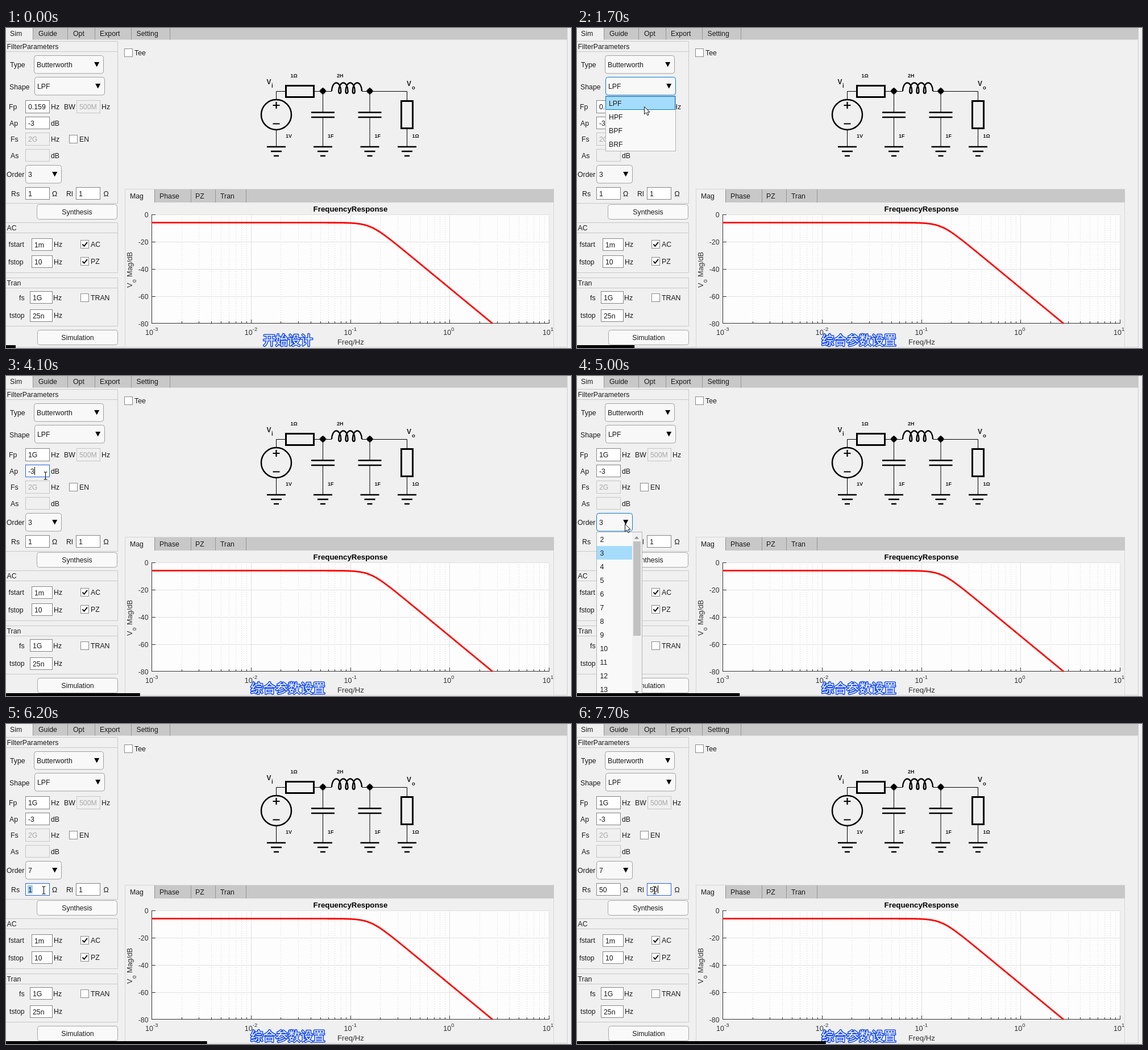
An HTML page that plays this animation: 994x563 px, repeating every 8 s.

```html
<!DOCTYPE html>
<html lang="zh">
<head>
<meta charset="utf-8">
<title>Filter design</title>
<style>
  html, body { margin: 0; width: 100%; height: 100%; overflow: hidden; background: #f0f0f0; }
  svg { display: block; width: 100%; height: 100%; }
  text { font-family: "Liberation Sans", Arial, sans-serif; font-size: 12.3px; fill: #1a1a1a; white-space: pre; }
  .b { font-weight: bold; }
  .cap { font: 500 21.9px "Noto Sans CJK SC", "Noto Sans CJK", sans-serif; fill: #fff;
    stroke: #1c50f0; stroke-width: 3.2px; stroke-linejoin: round; paint-order: stroke; }
</style>
</head>
<body>
<svg id="stage" viewBox="0 0 994 563"></svg>
<script>
const stage = document.getElementById('stage');
const BLUE = '#0a78d4', GREY = '#c8c8c8';
let layer = stage;

function el(tag, attrs, text) {
  const e = document.createElementNS('http://www.w3.org/2000/svg', tag);
  for (const a in attrs) e.setAttribute(a, attrs[a]);
  if (text !== undefined) e.textContent = text;
  layer.appendChild(e);
  return e;
}
const rect = (x, y, w, h, fill, stroke = 'none', more = {}) =>
  el('rect', { x, y, width: w, height: h, fill, stroke, ...more });
const path = (d, stroke = '#000', width = 1, fill = 'none', more = {}) =>
  el('path', { d, stroke, 'stroke-width': width, fill, ...more });
const text = (x, y, s, more = {}) => el('text', { x, y, ...more }, s);
const show = (e, on) => { e.style.display = on ? '' : 'none'; };
function group(make) {
  const outer = layer, g = el('g', {});
  layer = g;
  make();
  layer = outer;
  return g;
}

// ---- widgets ----
const fields = {};
function field(id, x, y, w, value, off = false, h = 22) {
  const box = rect(x + .5, y + .5, w - 1, h - 1, off ? '#f0f0f0' : '#fff', off ? '#c6c6c6' : '#858585');
  const mark = rect(x + 4, y + 3.5, 0, h - 7, '#99cdf5');
  const label = text(x + 5, y + 15.5, value, off ? { style: 'fill:#a8a8a8' } : {});
  const caret = rect(x, y + 4, 1, h - 8, '#000');
  show(caret, false);
  fields[id] = { x, box, mark, label, caret };
}
function setField(id, value, mode) {
  const f = fields[id];
  f.label.textContent = value;
  const w = f.label.getComputedTextLength();
  f.box.setAttribute('stroke', mode ? '#2a62e0' : '#858585');
  f.mark.setAttribute('width', mode === 'select' ? w + 2 : 0);
  show(f.caret, mode === 'caret');
  f.caret.setAttribute('x', Math.round(f.x + 5 + w));
}
function combo(x, y, w, value) {
  const box = rect(x + .5, y + .5, w - 1, 31.5, '#f8f8f8', '#a0a0a0', { rx: 4 });
  const label = text(x + 5, y + 20.5, value);
  const ax = x + w - 12.3;
  path(`M${ax - 4.5} ${y + 12}h9l-4.5 8.5z`, 'none', 0, '#000');
  return { box, label };
}
function check(x, y, label, on) {
  rect(x + .5, y + .5, 14, 14, '#fff', '#8a8a8a');
  if (on) path(`M${x + 3.5} ${y + 7.5}l3 3.3l5.5 -7`, '#111', 2);
  text(x + 18, y + 12, label);
}
function button(x, y, label) {
  rect(x + .5, y + .5, 141, 26, '#f9f9f9', '#a6a6a6', { rx: 4 });
  text(x + 71, y + 18, label, { 'text-anchor': 'middle' });
}
function panel(y, bottom, title) {
  path(`M0 ${y + .5}H196.5V${bottom + .5}H0M0 ${y + 18.5}H196`, GREY);
  text(1.5, y + 13.5, title);
}
function tabs(x, y, right, h, ends, names) {
  rect(x, y, right - x, h, GREY);
  rect(x, y, ends[0] - x, h + 1, '#f0f0f0');
  path(ends.map(e => `M${e + .5} ${y}v${h}`).join(''), '#969696');
  names.forEach(([tx, s]) => text(tx, y + h - 7, s));
}

rect(0, 0, 994, 563, '#f0f0f0');
tabs(0, 0, 987, 20.5, [47, 108, 156, 220, 288],
  [[7, 'Sim'], [57, 'Guide'], [118, 'Opt'], [165, 'Export'], [229.5, 'Setting']]);
path('M987.5 0V562M0 561.5H987', '#cfcfcf');
panel(23, 308, 'FilterParameters');
panel(342, 430, 'AC');
panel(439, 524, 'Tran');

[[7, 69, 'Type'], [6, 107.5, 'Shape'], [5, 143, 'Fp'], [79, 143, 'Hz'], [102, 143, 'BW'], [168, 143, 'Hz'],
 [6, 172, 'Ap'], [79, 172, 'dB'], [8, 200, 'Fs'], [79, 200, 'Hz'], [8, 228.5, 'As'], [79, 228.5, 'dB'],
 [1, 262, 'Order'], [9, 295.5, 'Rs'], [81, 295.5, 'Ω'], [106, 295.5, 'Rl'], [171.5, 295.5, 'Ω'],
 [4.5, 385, 'fstart'], [84, 385, 'Hz'], [4, 415.5, 'fstop'], [84, 415.5, 'Hz'],
 [23, 478.5, 'fs'], [83, 478.5, 'Hz'], [6, 510, 'tstop'], [84, 510, 'Hz']].forEach(a => text(...a));

combo(49, 48, 123, 'Butterworth');
const shape = combo(50, 86, 124, 'LPF');
const order = combo(34, 241, 64, '3');
field('fp', 34, 127, 43, '0.159', false, 23);
field('bw', 124, 127, 42, '500M', true, 23);
field('ap', 34, 156, 43, '-3');
field('fs', 34, 184, 43, '2G', true, 23);
field('as', 34, 213, 43, '', true);
field('rs', 34, 280, 43, '1');
field('rl', 123, 280, 43, '1');
field('f0', 45, 370, 37, '1m');
field('f1', 45, 400, 37, '10');
field('rate', 42, 463, 40, '1G');
field('stop', 42, 495, 40, '25n');
check(111, 188, 'EN');
check(131, 373, 'AC', true);
check(131, 403, 'PZ', true);
check(131, 467, 'TRAN');
check(208, 36, 'Tee');
button(54, 310, 'Synthesis');
button(55, 531, 'Simulation');

// ---- circuit ----
const ground = x => path(`M${x - 16.5} 209h33M${x - 9.5} 217h19M${x - 4.5} 225h9`, '#000', 2.4);
function cap(x) {
  path(`M${x} 111V148M${x} 157V208`);
  path(`M${x - 20.5} 148.5h41M${x - 20.5} 157h41`, '#000', 2.5);
  el('circle', { cx: x, cy: 111, r: 5 });
  path(`M${x - 6} 111h12M${x} 105v12`, '#000', 2);
  ground(x);
}
path('M475.5 127V111.5H491M542 111.5H573M626 111.5H705.5V128M475.5 179V208M705.5 177V208');
el('circle', { cx: 475.5, cy: 152.5, r: 26.5, fill: 'none', stroke: '#000', 'stroke-width': 2.5 });
path('M469.5 136h12M475.5 130v12M469.5 168.5h12', '#000', 2.2);
rect(492.5, 101.5, 49, 20, 'none', '#000', { 'stroke-width': 3 });
rect(695.5, 128.5, 20, 48, 'none', '#000', { 'stroke-width': 3 });
const hump = 'a8.1 14.5 0 0 1 16.25 0';
path('M573 111' + Array(4).fill(hump).join('a2 4 0 0 1 -4 0'), '#000', 2.4);
cap(557.5);
cap(640);
ground(475.5);
ground(705.5);
const bold = (x, y, s, size) => text(x, y, s, { class: 'b', style: `font-size:${size}px` });
bold(458.5, 99, 'V', 12);
bold(467, 105, 'i', 10);
bold(705, 101.5, 'V', 12);
bold(714, 107.5, 'o', 9.5);
[[500.5, 87, '1Ω'], [582, 87, '2H'], [492, 193, '1V'], [566, 193, '1F'], [648.5, 193, '1F'], [714.5, 193, '1Ω']]
  .forEach(([x, y, s]) => bold(x, y, s, 9));

// ---- chart ----
rect(209.5, 283.5, 754, 278, '#f0f0f0', '#d6d6d6');
tabs(210, 284, 964, 23, [261, 325, 368, 422], [[218, 'Mag'], [270, 'Phase'], [333, 'PZ'], [377, 'Tran']]);
const X0 = 256, X1 = 955, Y0 = 328, Y1 = 520, DEC = (X1 - X0) / 4;
const px = e => X0 + DEC * (e + 3);
const py = db => Y0 - 2.4 * db;
const crisp = v => Math.round(v) + .5;
rect(X0, Y0, X1 - X0, Y1 - Y0, '#fdfdfd');
let major = '', minor = '', ticks = '';
for (let d = -3; d <= 1; d++) {
  const x = crisp(px(d));
  major += `M${x} ${Y0}V${Y1}`;
  ticks += `M${x} ${Y1}v-7`;
  for (let m = 2; m < 10 && d < 1; m++) {
    const xm = crisp(px(d + Math.log10(m)));
    minor += `M${xm} ${Y0}V${Y1}`;
    ticks += `M${xm} ${Y1}v-4`;
  }
  text(px(d) - 11, 540, '10', { style: 'font-size:12.5px;fill:#333' });
  text(px(d) + 3, 533, d, { style: 'font-size:9.5px;fill:#333' });
}
for (let db = 0; db >= -80; db -= 20) {
  const y = crisp(py(db)) - (db === -80 ? 1 : 0);
  major += `M${X0} ${y}H${X1}`;
  ticks += `M${X0} ${y}h7`;
  text(250.5, py(db) + 5, db, { 'text-anchor': 'end', style: 'fill:#333' });
}
path(minor, '#d0d0d0', 1, 'none', { 'stroke-dasharray': '1 3' });
path(major, '#e0e0e0');
path(ticks + `M${X0 + .5} ${Y0}V${Y1 - .5}H${X1}`, '#333');

let curve = '';
for (let i = 0; i <= 300; i++) {
  const e = -3 + i * 3.433 / 300;
  const db = -6.02 - 10 * Math.log10(1 + (10 ** e / .159) ** 6);
  curve += `${i ? 'L' : 'M'}${px(e).toFixed(2)} ${py(Math.max(db, -80)).toFixed(2)}`;
}
path(curve, '#f00', 2.8);
text(606, 323, 'FrequencyResponse', { class: 'b', 'text-anchor': 'middle', style: 'font-size:13.3px;fill:#000' });
text(606.5, 557, 'Freq/Hz', { 'text-anchor': 'middle', style: 'font-size:13.2px;fill:#333' });
const axis = (y, x, s, size) =>
  text(0, 0, s, { transform: `translate(${x} ${y}) rotate(-90)`, style: `font-size:${size}px;fill:#333` });
axis(457, 222, 'V', 12.8);
axis(448, 229, 'o', 10);
axis(438, 222, 'Mag/dB', 12.8);

// ---- popups ----
const shapeList = group(() => {
  rect(50.5, 119.5, 123, 97, '#f9f9f9', '#b4b4b4');
  rect(50.5, 120.5, 122, 23, '#a6dcfb', BLUE);
  ['LPF', 'HPF', 'BPF', 'BRF'].forEach((s, i) => text(56, 136.5 + 24 * i, s));
});
let hover;
const orderList = group(() => {
  rect(34.5, 274.5, 80, 288, '#f9f9f9', '#b4b4b4');
  rect(35, 299, 62, 24, '#a6dcfb');
  hover = rect(35.5, 0, 61, 23, '#d9effc', BLUE);
  for (let n = 2; n <= 13; n++) text(40.5, 291.5 + 24 * (n - 2), n);
  rect(97, 275, 17, 287, '#f1f1f1');
  rect(99, 291, 13, 166, '#c1c1c1');
  path('M101 286.5h8l-4 -4.5z', 'none', 0, '#8a8a8a');
  path('M101 554.5h8l-4 4.5z', 'none', 0, '#444');
});

const caption = text(496, 557, '', { class: 'cap', 'text-anchor': 'middle' });
const bar = rect(0, 558, 17, 5, '#000');
const click = el('circle', { r: 12, fill: '#f2e63c', opacity: .7 });
const arrow = path('M0 0V13.2L3.2 10.3L5.4 15.2L7.6 14.2L5.5 9.5H9.6Z', '#111', 1, '#fff');
const beam = path('M-3 -6.5H-1L0 -5.5L1 -6.5H3M0 -5.5V5.5M-3 6.5H-1L0 5.5L1 6.5H3', '#111', 1.1);

// ---- timeline, in steps of 300 ms after a first hold of 500 ms ----
const base = { cap: '综合参数设置', fp: '0.159', ap: '-3', rs: '1', rl: '1', ord: '3',
  focus: '', mode: '', open: '', hot: 3, click: false };
const changes = [
  [0, { cap: '开始设计' }],
  [2, { cap: base.cap }],
  [4, { open: 'shape' }],
  [7, { open: '' }],
  [8, { focus: 'fp', mode: 'caret' }],
  [9, { mode: 'select' }],
  [10, { fp: '1', mode: 'caret' }],
  [11, { fp: '1G' }],
  [13, { focus: 'ap' }],
  [15, { focus: '' }],
  [16, { open: 'order', hot: 3 }],
  [17, { hot: 5 }],
  [18, { hot: 7, click: true }],
  [19, { open: '', ord: '7', click: false }],
  [20, { focus: 'rs', mode: 'select' }],
  [21, { rs: '5', mode: 'caret' }],
  [22, { rs: '50' }],
  [23, { focus: 'rl', mode: 'select' }],
  [24, { rl: '5', mode: 'caret' }],
  [25, { rl: '50' }]
];
// step, x, y, is text beam
const moves = [
  [2, 190, 160, 0], [4, 130, 108, 0], [5, 118, 138, 0], [6, 116, 134, 0], [8, 68, 139, 1],
  [9, 26, 138, 0], [11, 28, 140, 0], [13, 69, 175, 1], [14, 69, 176, 1], [16, 84, 260, 0],
  [17, 66, 352, 0], [18, 60, 399, 0], [19, 60, 396, 0], [20, 66, 292, 1], [21, 84, 294, 0],
  [22, 84, 294, 0], [23, 136, 292, 1], [25, 136, 292, 1]
];

function pointer(k) {
  const i = moves.findIndex(m => m[0] >= k);
  const b = moves[i], a = moves[i - 1] || b;
  const u = b === a ? 1 : (k - a[0]) / (b[0] - a[0]);
  return [a[1] + (b[1] - a[1]) * u, a[2] + (b[2] - a[2]) * u, u === 1 ? b[3] : a[3]];
}

function draw(k) {
  const s = { ...base };
  for (const [at, c] of changes) if (at <= k) Object.assign(s, c);
  caption.textContent = s.cap;
  bar.setAttribute('width', 17 + 16.83 * k);
  for (const id of ['fp', 'ap', 'rs', 'rl']) setField(id, s[id], s.focus === id ? s.mode : '');
  order.label.textContent = s.ord;
  shape.box.setAttribute('stroke', s.open === 'shape' ? BLUE : '#a0a0a0');
  order.box.setAttribute('stroke', s.open === 'order' ? BLUE : '#a0a0a0');
  show(shapeList, s.open === 'shape');
  show(orderList, s.open === 'order');
  hover.setAttribute('y', 275 + 24 * (s.hot - 2));
  show(hover, s.hot !== 3);

  const [x, y, isBeam] = pointer(k);
  show(arrow, k > 1 && !isBeam);
  show(beam, k > 1 && isBeam);
  show(click, s.click);
  for (const e of [arrow, beam]) e.setAttribute('transform', `translate(${x + .5} ${y + .5})`);
  click.setAttribute('transform', `translate(${x} ${y + 3})`);
}

let last = -1;
function tick() {
  const t = performance.now() % 8000;
  const k = t < 500 ? 0 : 1 + Math.floor((t - 500) / 300);
  if (k !== last) draw(last = k);
  requestAnimationFrame(tick);
}
tick();
</script>
</body>
</html>
```
